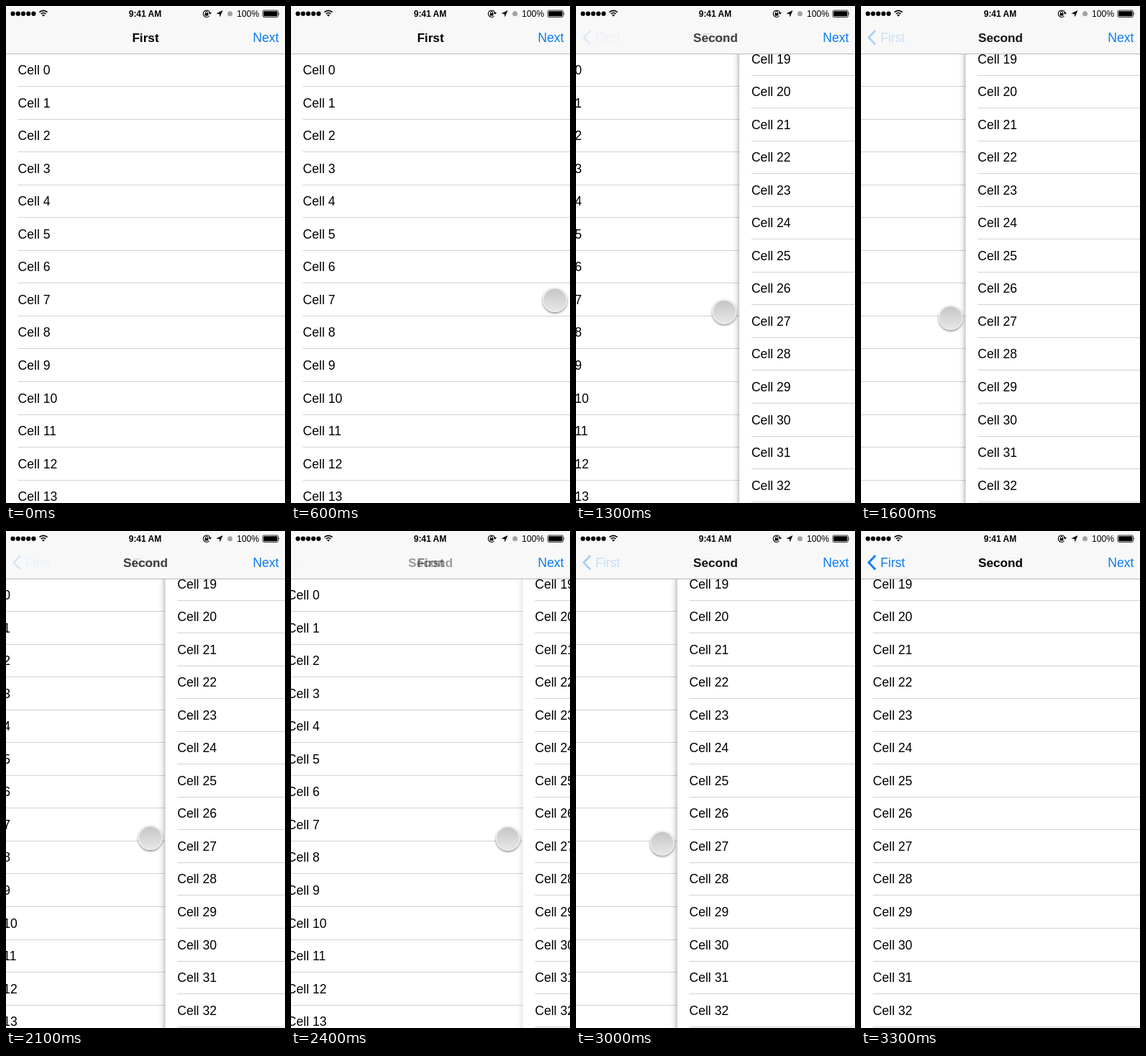
An HTML page for the animation above (3.5 s loop, 388 by 690 pixels).

```html
<!DOCTYPE html>
<html lang="en">
<head>
<meta charset="utf-8">
<title>Swipe navigation</title>
<style>
  html, body { margin: 0; width: 100%; height: 100%; overflow: hidden; background: #fff; }
  svg { display: block; font: 17.6px "Liberation Sans", Arial, sans-serif; }
  .title { font-size: 17.2px; font-weight: bold; text-anchor: middle; }
  .status { font-size: 12.2px; }
  .line { fill: none; stroke: #000; }
</style>
</head>
<body>
<svg width="388" height="690" viewBox="0 0 388 690">
  <defs>
    <linearGradient id="edge">
      <stop offset="0" stop-opacity="0"/>
      <stop offset=".5" stop-opacity=".05"/>
      <stop offset="1" stop-opacity=".22"/>
    </linearGradient>
    <linearGradient id="knob" x2="0" y2="1">
      <stop offset="0" stop-color="#c6c6c6"/>
      <stop offset="1" stop-color="#e6e6e6"/>
    </linearGradient>
    <filter id="drop" x="-30%" y="-30%" width="160%" height="160%">
      <feDropShadow dx="0" dy="1.5" stdDeviation="1.5" flood-opacity=".5"/>
    </filter>
  </defs>

  <g id="first"></g>
  <g id="second">
    <rect id="shadow" x="-10" y="66" width="10" height="624" fill="url(#edge)"/>
    <rect width="388" height="690" fill="#fff"/>
  </g>

  <rect width="388" height="66" fill="#f8f8f8"/>
  <rect y="66" width="388" height="1" fill="#b8b8b8"/>
  <g id="status">
    <g id="signal"></g>
    <g class="line" stroke-width="1.7">
      <path d="M46.5 8.6a7.8 7.8 0 0 1 11 0M48.7 11a4.7 4.7 0 0 1 6.6 0"/>
    </g>
    <path d="M52 14.8l-2-2.2a2.9 2.9 0 0 1 4 0z"/>
    <text class="status" x="193.5" y="15" text-anchor="middle" font-weight="bold" style="font-size:12px">9:41 AM</text>
    <path class="line" d="M283.6 9.2a4.8 4.8 0 1 0 -1 4.8" stroke-width="1.1"/>
    <path d="M281.6 9h4.4l-2.2 2.8zM276.6 10h4.8v3.4h-4.8z"/>
    <path class="line" d="M277.6 10v-1.2a1.4 1.4 0 0 1 2.8 0V10"/>
    <path d="M301.5 6l-9.2 4.4 4.5.6.6 4.4z"/>
    <circle cx="311.5" cy="10.7" r="3.5" fill="#a2a2a2"/>
    <text class="status" x="321" y="15">100%</text>
    <rect class="line" x="357" y="6" width="21.5" height="9.5" rx="1.8" stroke-width=".8"/>
    <rect x="358.2" y="7.2" width="19.1" height="7.1" rx=".8"/>
    <path d="M379.6 9v3.5q1.8-1.75 0-3.5"/>
  </g>
  <g fill="#0a7cf5">
    <polyline id="chevron" points="20,34 10.8,43.7 20,53.4" fill="none" stroke="#0a7cf5" stroke-width="2.9"/>
    <text id="back" x="27" y="49.8">First</text>
    <text x="379.5" y="49.8" text-anchor="end">Next</text>
  </g>
  <text id="firstTitle" class="title" x="194" y="50">First</text>
  <text id="secondTitle" class="title" x="194" y="50">Second</text>

  <g id="touch" filter="url(#drop)">
    <circle r="17" fill="#ededed"/>
    <circle r="15.5" fill="url(#knob)"/>
  </g>
</svg>
<script>
const WIDTH = 388, ROW = 45.53, LOOP = 3500, STEP = 100;
const el = id => document.getElementById(id);

function add(parent, tag, attrs, text = '') {
  const node = document.createElementNS('http://www.w3.org/2000/svg', tag);
  for (const key in attrs) node.setAttribute(key, attrs[key]);
  node.textContent = text;
  parent.append(node);
}

function addRows(view, from, to, top) {
  for (let n = from; n <= to; n++, top += ROW) {
    add(view, 'text', { x: 16.5, y: top + 29 }, 'Cell ' + n);
    add(view, 'rect', { x: 16.5, y: Math.floor(top + ROW), width: WIDTH, height: 1, fill: '#d2d2d4' });
  }
}

addRows(el('first'), 0, 13, 66.2);
addRows(el('second'), 19, 32, 50.7);
for (let i = 0; i < 5; i++) add(el('signal'), 'circle', { cx: 9.6 + i * 7.2, cy: 10.7, r: 3.1 });

// Cosine easing between [time, value] keys.
function track(keys, t) {
  if (t <= keys[0][0]) return keys[0][1];
  for (let i = 1; i < keys.length; i++) {
    const [t0, v0] = keys[i - 1], [t1, v1] = keys[i];
    if (t <= t1) return v0 + (v1 - v0) * (1 - Math.cos(Math.PI * (t - t0) / (t1 - t0))) / 2;
  }
  return keys[keys.length - 1][1];
}

const drag = [[665, WIDTH], [1750, 134], [2505, 332], [3100, 127]];
const panel = [...drag, [3200, 40], [3300, 0]];
const touchY = [[665, 408], [1750, 434], [2100, 426], [2505, 427], [3100, 434]];
const touchAlpha = [[300, 0], [600, 1], [3100, 1], [3300, 0]];

const move = (id, x, y = 0) => el(id).setAttribute('transform', `translate(${x} ${y})`);
const fade = (id, alpha) => el(id).setAttribute('opacity', alpha);

function draw() {
  const t = Math.floor(performance.now() % LOOP / STEP) * STEP;
  const x = track(panel, t);
  const progress = 1 - x / WIDTH, rest = 1 - progress;

  move('first', (x - WIDTH) / 3);
  move('second', x);
  fade('shadow', Math.min(1, progress * 2.5));

  fade('firstTitle', rest ** 4);
  fade('secondTitle', 1 - rest ** 2.5);
  fade('back', progress ** 3.4);
  fade('chevron', progress ** 2.5);

  move('touch', track(drag, t) - 21, track(touchY, t));
  fade('touch', track(touchAlpha, t));
  requestAnimationFrame(draw);
}
draw();
</script>
</body>
</html>
```
